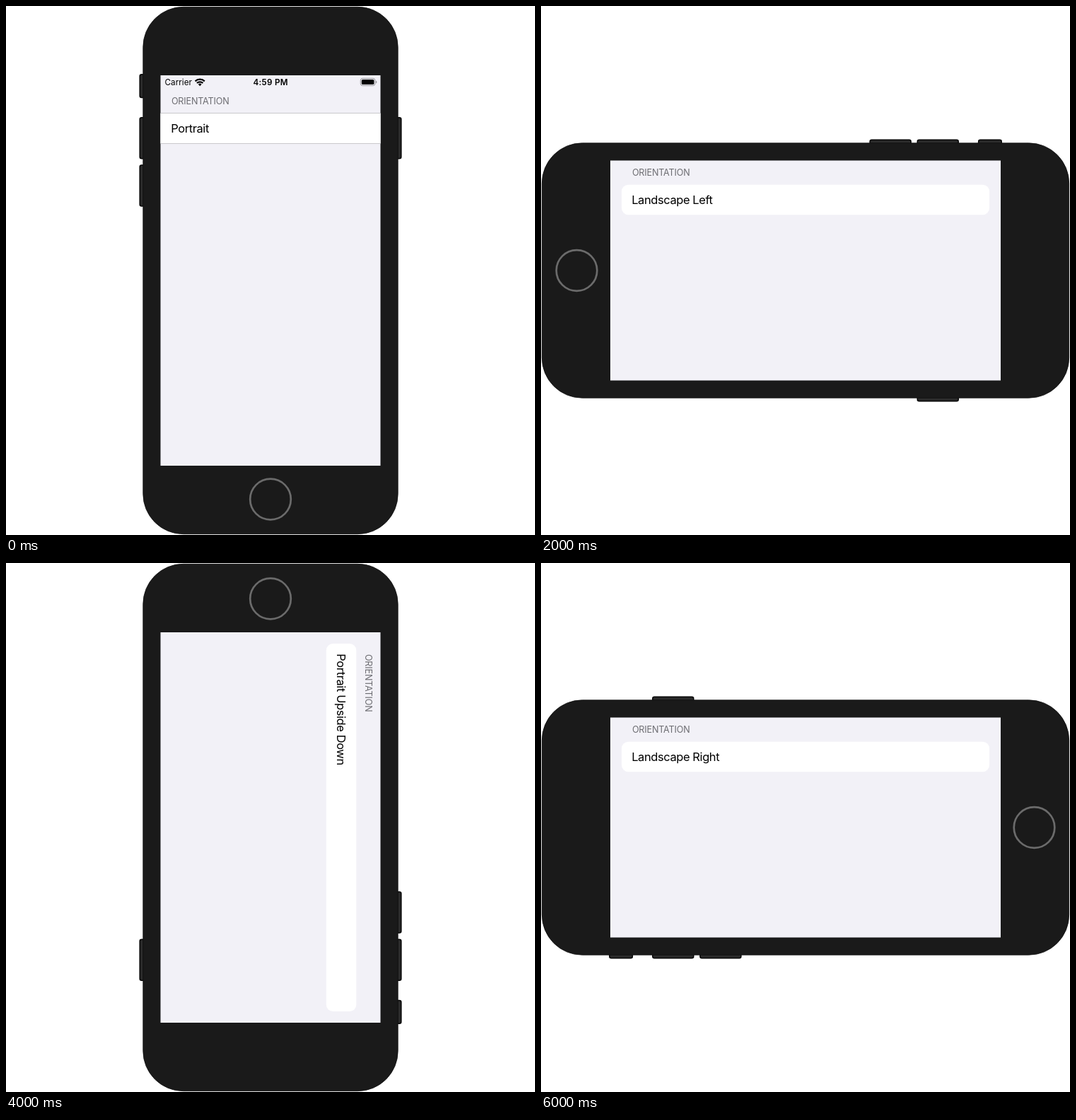
Recreate the animation shown at these times as an HTML page. Size 748x748 px, loop 8000 ms.

```html
<!DOCTYPE html>
<html lang="en">
<head>
<meta charset="utf-8">
<title>Device orientation</title>
<style>
  html, body { margin: 0; width: 100%; height: 100%; overflow: hidden; background: #fff; }
  svg { display: block; width: 100%; height: 100%; }
  text { font-family: Inter, "Liberation Sans", sans-serif; }
  .head { font-size: 12.6px; letter-spacing: -.17px; fill: #6d6d72; }
  .label { font-size: 16.5px; letter-spacing: -.42px; }
  .status { font-size: 11.66px; letter-spacing: .06px; }
  .time { font-weight: 600; letter-spacing: .3px; text-anchor: middle; }
  .button { fill: #2a2a2a; stroke: #050505; stroke-width: 1.5; }
  .waves { fill: none; stroke: #000; stroke-width: 2.3; }
</style>
</head>
<body>
<svg viewBox="0 0 748 748">
  <g id="phone">
    <g class="button">
      <rect x="189.2" y="96.8" width="12" height="32.6" rx="2.5"/>
      <rect x="189.2" y="157.8" width="12" height="58" rx="2.5"/>
      <rect x="189.2" y="224.9" width="12" height="58" rx="2.5"/>
      <rect x="546.8" y="157.8" width="12" height="58" rx="2.5"/>
    </g>
    <rect x="193.8" y="1.3" width="360.4" height="745.4" rx="57" fill="#1a1a1a" stroke="#101010" stroke-width=".8"/>
    <rect x="218.5" y="98" width="311" height="552" fill="#f2f1f7"/>
    <circle cx="374" cy="697.5" r="28.8" fill="none" stroke="#6b6b6b" stroke-width="2.7"/>
  </g>

  <g id="upright">
    <text class="status" x="224.5" y="112">Carrier</text>
    <g class="waves">
      <path d="M267.6 106.4a9.3 9.3 0 0 1 13.2 0M270 109a6 6 0 0 1 8.4 0"/>
      <path d="M274.2 113.2l-2.4-2.5a3.4 3.4 0 0 1 4.8 0z" fill="#000" stroke="none"/>
    </g>
    <text class="status time" x="374.2" y="112">4:59 PM</text>
    <rect x="501.3" y="102.4" width="20.6" height="10.2" rx="2.8" fill="none" stroke="#98989c"/>
    <rect x="502.8" y="103.9" width="17.6" height="7.2" rx="1.5"/>
    <path d="M523 105.6q1.4.5 1.4 1.9t-1.4 1.9z" fill="#98989c"/>
    <text class="head" x="233.9" y="139.1">ORIENTATION</text>
    <rect x="218.5" y="151" width="311" height="44" fill="#c9c9cc"/>
    <rect x="218.5" y="152" width="311" height="42" fill="#fff"/>
    <text class="label" x="233.2" y="179">Portrait</text>
  </g>

  <g id="wide">
    <text class="head" x="128.9" y="240.1">ORIENTATION</text>
    <rect x="114" y="252.7" width="520" height="42.5" rx="9.5" fill="#fff"/>
    <text class="label" id="name" x="128.2" y="280"></text>
  </g>
</svg>
<script>
  const [phone, upright, wide, label] =
    ["phone", "upright", "wide", "name"].map(id => document.getElementById(id));
  const names = ["Portrait", "Landscape Left", "Portrait Upside Down", "Landscape Right"];
  const STEP = 2000;
  const turn = (el, deg) => el.setAttribute("transform", `rotate(${deg} 374 374)`);
  const show = (el, on) => el.setAttribute("display", on ? "inline" : "none");
  let last = -1;

  function draw(now) {
    const step = Math.floor(now / STEP) % names.length;
    if (step !== last) {
      last = step;
      turn(phone, step * 90);
      // The interface has no upside-down layout: it keeps the landscape one.
      turn(wide, step === 2 ? 90 : 0);
      show(upright, step === 0);
      show(wide, step !== 0);
      label.textContent = names[step];
    }
    requestAnimationFrame(() => draw(performance.now()));
  }
  draw(performance.now());
</script>
</body>
</html>
```
